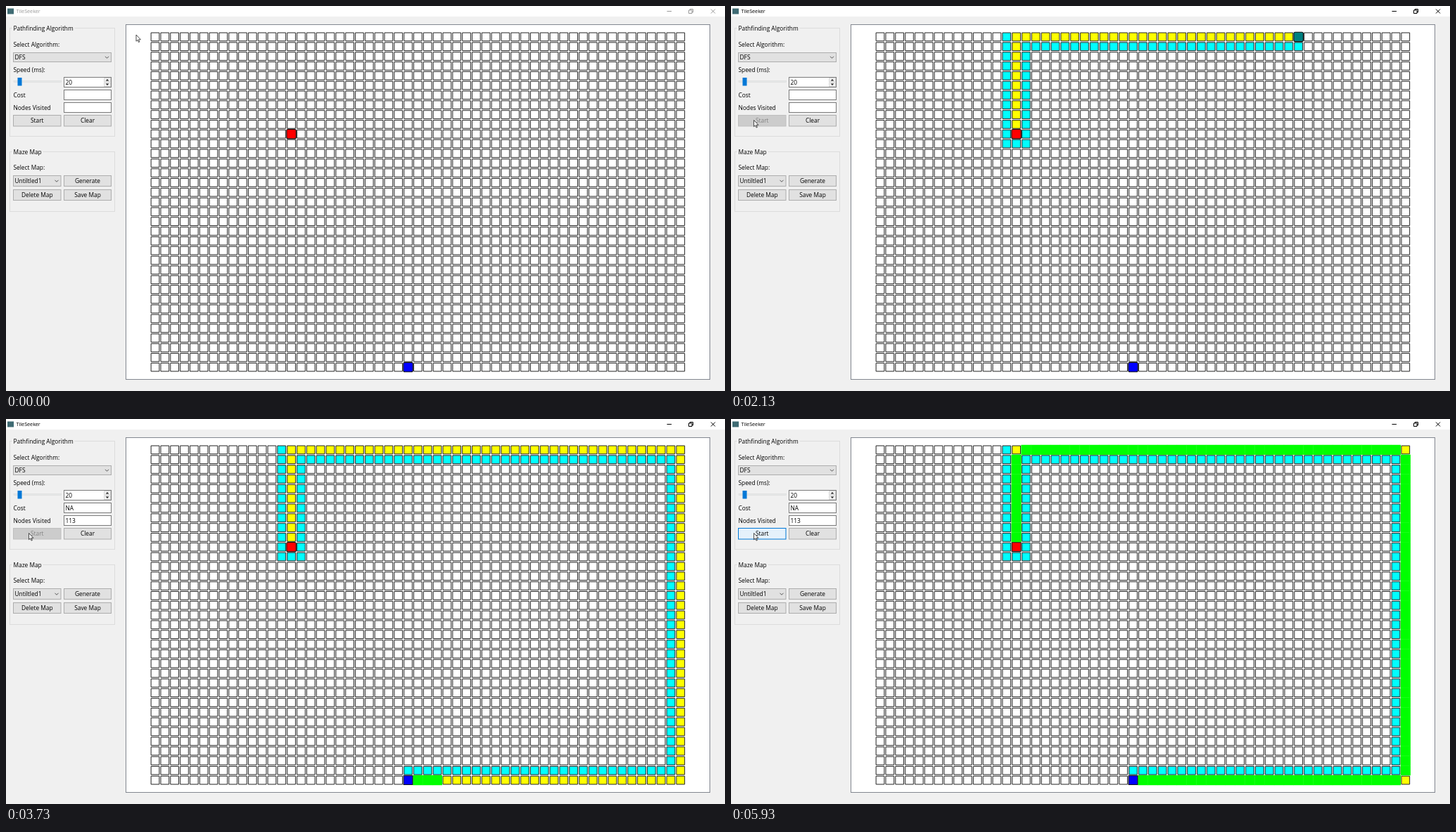
Write an HTML page with a canvas that moves like this. It is 1022 px wide and 548 px high and loops after 6.74 s.

```html
<!DOCTYPE html>
<html lang="en">
<head>
<meta charset="utf-8">
<title>TileSeeker</title>
<style>
html, body { margin: 0; width: 100%; height: 100%; overflow: hidden; background: #f0f0f0; }
canvas, svg { position: absolute; left: 0; top: 0; display: block; }
text { font: 8.35px "Open Sans", "Noto Sans", sans-serif; fill: #000; }
.mid { text-anchor: middle; }
.btn { fill: #e1e1e1; stroke: #adadad; }
.field { fill: #fff; stroke: #7a7a7a; }
.group { fill: none; stroke: #dcdcdc; }
.mark { fill: none; stroke: #444; stroke-width: .9; }
</style>
</head>
<body>
<canvas id="grid" width="1022" height="548"></canvas>
<svg id="ui" width="1022" height="548" viewBox="0 0 1022 548">
  <rect width="1022" height="15" fill="#fff"/>
  <rect x="2" y="3.5" width="9" height="8" fill="#3f6b73"/>
  <text id="title" x="14.5" y="10.4" style="font-size:7.2px">TileSeeker</text>
  <g id="controls" fill="none" stroke-width="1">
    <path d="M939.5 7.5h6.5"/>
    <path d="M970.5 6h4.5v4.5h-4.5zM972 6v-1.5h4.5v4.5h-1.5"/>
    <path d="M1002 4.5l6 6M1008 4.5l-6 6"/>
  </g>
  <g id="widgets"></g>
  <path id="cursor" d="M0 0V9.2L2.1 7.3L3.5 10.6L4.9 10L3.5 6.8H6.4Z" fill="#fff" stroke="#222" stroke-width=".8"/>
</svg>
<script>
const LOOP = 6740, COLS = 55, ROWS = 35, PITCH = 13.83, X0 = 212, Y0 = 43.9;
const START = [14, 10], END = [26, 34];
const CLICK = 20, FOUND = 55, DONE = 89;
// [tick, cells done]
const SEARCH = [[20, 0], [23, 10], [30, 32], [41, 68], [42, 72], [52, 103], [55, 112]];
const TRACE = [[55, 0], [56, 3], [63, 26], [66, 37], [74, 62], [82, 88], [85, 97], [88, 107], [89, 108]];

const $ = id => document.getElementById(id);
const ctx = $('grid').getContext('2d');

// ---- side panel ----
const text = (s, x, y, attr = '') => `<text x="${x}" y="${y}" ${attr}>${s}</text>`;
const box = (cls, x, y, r, b, attr = '') =>
  `<rect class="${cls}" x="${x}" y="${y}" width="${r - x}" height="${b - y}" ${attr}/>`;
const button = (s, x, y, r, b, id = '') =>
  box('btn', x, y, r, b, id && `id="${id}"`) +
  text(s, (x + r) / 2, (y + b) / 2 + 3.2, 'class="mid"' + (id && ` id="${id}Text"`));
const combo = (s, x, y, r, b) =>
  box('btn', x, y, r, b) + text(s, x + 2, (y + b) / 2 + 3.2) +
  `<path class="mark" d="M${r - 8.5} ${(y + b) / 2 - 1.2}l2.5 2.5l2.5 -2.5"/>`;
const group = (s, y, b, w) =>
  box('group', 5.5, y, 154.5, b) +
  `<rect x="8.5" y="${y - 2}" width="${w}" height="4" fill="#f0f0f0"/>` + text(s, 10.5, y + 3.6);

$('widgets').innerHTML =
  group('Pathfinding Algorithm', 31.5, 185.5, 89) +
  text('Select Algorithm:', 10.5, 58) +
  combo('DFS', 10.5, 66.5, 149.5, 79.5) +
  text('Speed (ms):', 10.5, 94) +
  '<rect x="11" y="106.5" width="67.5" height="2" fill="#e7eaea" stroke="#d6d6d6" stroke-width=".5"/>' +
  '<rect x="16.5" y="102" width="6" height="11.5" fill="#0078d7"/>' +
  box('field', 82.5, 101.5, 149.5, 115.5) + text('20', 84.5, 111.6) +
  '<path d="M139.5 102.5h9v5.5h-9zM139.5 109h9v5.5h-9z" fill="#f0f0f0" stroke="#c4c4c4" stroke-width=".6"/>' +
  '<path d="M141.7 106.6l2.3 -2.6l2.3 2.6zM141.7 110.4l2.3 2.6l2.3 -2.6z" fill="#222"/>' +
  text('Cost', 10.5, 130) + box('field', 82.5, 119.5, 149.5, 133.5) + text('', 84.5, 129.7, 'id="cost"') +
  text('Nodes Visited', 10.5, 148) + box('field', 82.5, 137.5, 149.5, 151.5) + text('', 84.5, 147.7, 'id="visited"') +
  button('Start', 10.5, 155.5, 78, 171, 'start') +
  button('Clear', 82.5, 155.5, 149.5, 171) +
  group('Maze Map', 207.5, 292.5, 44) +
  text('Select Map:', 10.5, 233.4) +
  combo('Untiltled1', 10.5, 241.5, 78, 256.5) +
  button('Generate', 82.5, 241.5, 149.5, 256.5) +
  button('Delete Map', 10.5, 261.5, 78, 276.5) +
  button('Save Map', 82.5, 261.5, 149.5, 276.5);

// ---- route ----
const route = [START];
function walk(dx, dy, n) {
  while (n--) {
    const [x, y] = route[route.length - 1];
    route.push([x + dx, y + dy]);
  }
}
walk(0, -1, 10); walk(1, 0, 40); walk(0, 1, 34); walk(-1, 0, 28);

// Way back cuts the corners diagonally.
const isCorner = (p, i) => i === 10 || i === 50 || i === 84;
const back = route.filter((p, i) => i > 0 && i < 112 && !isCorner(p, i)).reverse();

function lookup(points, k) {
  if (k <= points[0][0]) return points[0][1];
  for (let i = 1; i < points.length; i++) {
    const [a, u] = points[i - 1], [b, v] = points[i];
    if (k <= b) return Math.round(u + (v - u) * (k - a) / (b - a));
  }
  return points[points.length - 1][1];
}

// ---- grid ----
const cx = c => X0 + c * PITCH, cy = r => Y0 + r * PITCH;

function cell(c, r, fill) {
  const h = 5.85;
  ctx.fillStyle = fill;
  ctx.strokeStyle = '#222';
  ctx.lineWidth = 1;
  ctx.beginPath();
  ctx.rect(cx(c) - h, cy(r) - h, 2 * h, 2 * h);
  ctx.fill();
  ctx.stroke();
}

function node([c, r], fill, flat) {
  const h = flat ? 6.4 : 6.7;
  ctx.fillStyle = fill;
  ctx.strokeStyle = '#111';
  ctx.lineWidth = 1.1;
  ctx.beginPath();
  ctx.roundRect(cx(c) - h, cy(r) - h, 2 * h, 2 * h, flat ? 0 : 2);
  ctx.fill();
  ctx.stroke();
}

function drawGrid(k) {
  const n = lookup(SEARCH, k), m = lookup(TRACE, k);
  const color = {};
  for (let i = 0; i < n; i++) {
    const [x, y] = route[i];
    for (let dx = -1; dx < 2; dx++)
      for (let dy = -1; dy < 2; dy++) color[[x + dx, y + dy]] = '#0ff';
  }
  for (let i = 0; i < n; i++) color[route[i]] = '#ff0';

  ctx.fillStyle = '#f0f0f0';
  ctx.fillRect(0, 0, 1022, 548);
  ctx.fillStyle = '#fff';
  ctx.strokeStyle = '#828790';
  ctx.lineWidth = 1;
  ctx.fillRect(170.5, 26.5, 830, 505);
  ctx.strokeRect(170.5, 26.5, 830, 505);

  for (let c = 0; c < COLS; c++)
    for (let r = 0; r < ROWS; r++) cell(c, r, color[[c, r]] || '#fff');

  ctx.fillStyle = '#0f0';
  for (const [c, r] of back.slice(0, m))
    ctx.fillRect(cx(c) - 7.1, cy(r) - 7.1, 14.2, 14.2);

  if (n > 0 && k < FOUND) node(route[n], '#008080');
  node(START, '#f00', k >= DONE);
  node(END, '#00f', k >= FOUND);
}

// ---- panel state ----
const mix = (a, b, p) => `rgb(${a.map((v, i) => Math.round(v + (b[i] - v) * p))})`;

function drawPanel(k) {
  const ink = k < CLICK ? '#999' : '#000';
  $('title').style.fill = ink;
  $('controls').setAttribute('stroke', ink);
  $('cost').textContent = k < FOUND ? '' : 'NA';
  $('visited').textContent = k < FOUND ? '' : '113';

  const p = Math.min(k / 11, 1), e = p * p * (3 - 2 * p);
  const x = 185 - 152.5 * e, y = 41 + 121.5 * e;
  $('cursor').setAttribute('transform', `translate(${x} ${y})`);

  const busy = k > CLICK && k < DONE;
  const over = x < 78 && y > 155.5;
  const fade = busy ? Math.max(0, Math.min(1, (k - 23) / 5)) : 0;
  const style = $('start').style;
  style.fill = !over ? '' : k === CLICK ? '#cce4f7' : mix([229, 241, 251], [204, 204, 204], fade);
  style.stroke = !over ? '' : k === CLICK ? '#005499' : mix([0, 120, 215], [191, 191, 191], fade);
  $('startText').style.fill = busy ? '#838383' : '#000';
}

// 15 ticks per second, on a 10 ms clock
const tickAt = t => Math.min(DONE, Math.floor((Math.floor(t / 10) + 0.5) * 0.15));

let shown = -1;
function frame() {
  const k = tickAt(performance.now() % LOOP);
  if (k !== shown) {
    shown = k;
    drawGrid(k);
    drawPanel(k);
  }
  requestAnimationFrame(frame);
}
frame();
</script>
</body>
</html>
```
